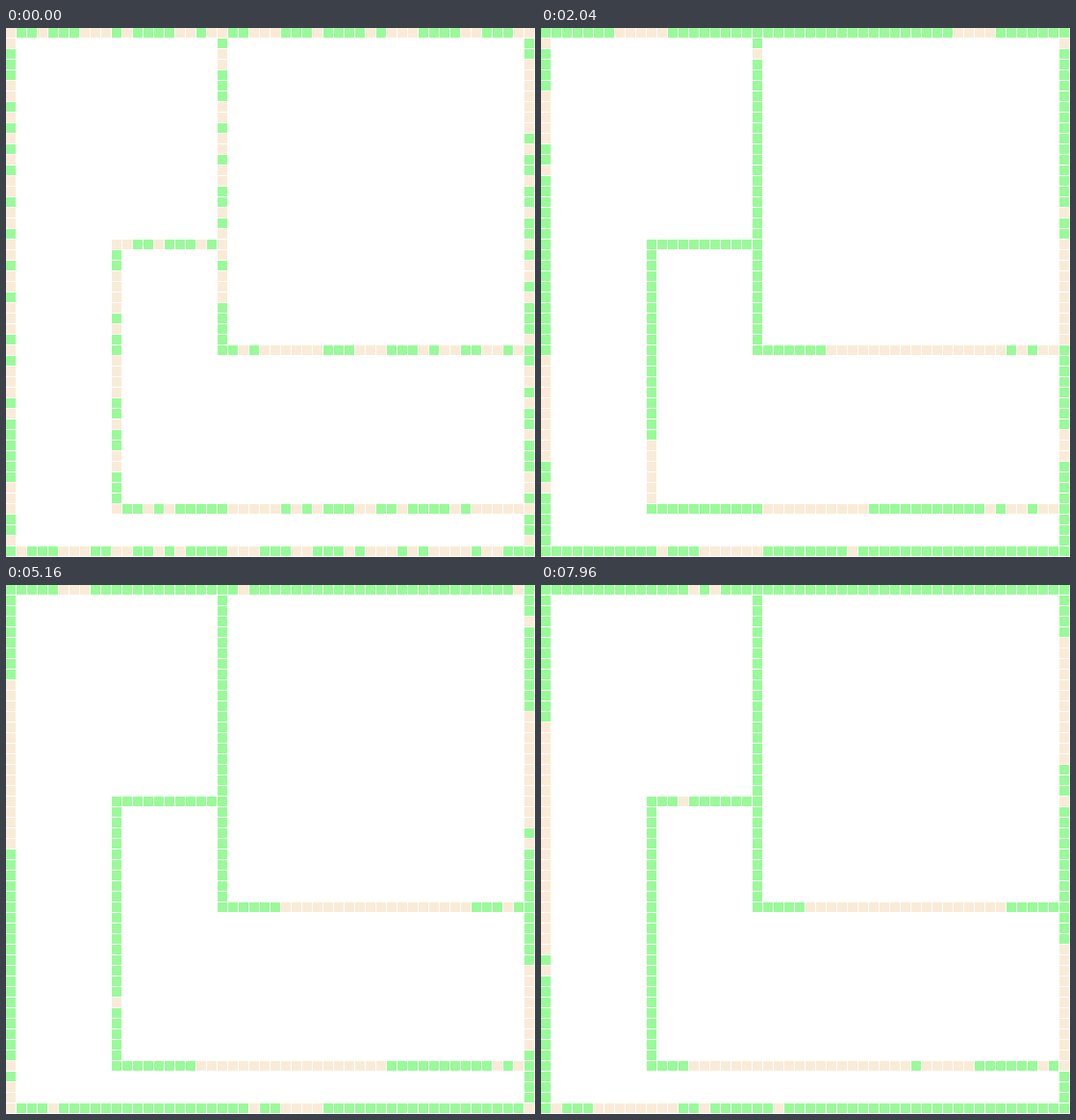
An HTML page for the animation above (8 s loop, 550 by 550 pixels).

```html
<!DOCTYPE html>
<html lang="en">
<head>
<meta charset="utf-8">
<title>Two-state domains on a wire frame</title>
<style>
  html, body { margin: 0; width: 100%; height: 100%; overflow: hidden; background: #fff; }
  svg { display: block; width: 100vw; height: 100vh; }
</style>
</head>
<body>
<svg id="stage" viewBox="0 0 550 550" shape-rendering="crispEdges"></svg>
<script>
const LOOP = 8000, STEP = 40, PITCH = 11, SIZE = 10, LAST = 49;
const GREEN = '#98fb98', CREAM = '#faebd7';
const LIVELY = 0.05, CALM = 0.005;   // chance that a settled cell is flipped
const CREAM_SHARE = 0.44, SETTLE_SECONDS = 0.55;

// A cream run whose two ends drift evenly over the loop; it is gone while they are crossed.
const drift = (first, last, endFirst, endLast) => ({ first, last, endFirst, endLast });
const row = (y, from, to, noise, ...runs) => ({ y, from, to, noise, runs });
const column = (x, from, to, noise, ...runs) => ({ x, from, to, noise, runs });

const lines = [
  row(0, 0, LAST, LIVELY, drift(35, 46, 51, 30), drift(9, 15, 3, 1)),
  row(LAST, 0, LAST, LIVELY, drift(7, 14, 38, 37), drift(-12, -23, 5, 12)),
  column(0, 1, 48, LIVELY, drift(3, 1, 13, 36), drift(22, 31, 58, 67)),
  column(LAST, 1, 48, LIVELY, drift(25, 34, 5, 16), drift(40, 38, 34, 45)),
  column(20, 1, 30, CALM),
  row(20, 10, 19, CALM),
  column(10, 21, 44, CALM, drift(39, 56, 39, 30)),
  row(30, 21, 48, CALM, drift(28, 43, 25, 43), drift(46, 50, 48, 46)),
  row(45, 10, 48, LIVELY, drift(24, 27, 14, 40), drift(42, 49, 47, 47))
];

function random(a, b) {
  let h = Math.imul(a + 1, 374761393) ^ Math.imul(b + 7, 668265263);
  h = Math.imul(h ^ (h >>> 13), 1274126177);
  h = Math.imul(h ^ (h >>> 16), 2246822519);
  return ((h ^ (h >>> 15)) >>> 0) / 4294967296;
}

const mix = (a, b, k) => Math.round(a + (b - a) * k);

const stage = document.getElementById('stage');
const cells = [];
for (const line of lines) {
  for (let n = line.from; n <= line.to; n++) {
    const id = cells.length;
    const rect = document.createElementNS('http://www.w3.org/2000/svg', 'rect');
    rect.setAttribute('x', (line.x ?? n) * PITCH);
    rect.setAttribute('y', (line.y ?? n) * PITCH);
    rect.setAttribute('width', SIZE);
    rect.setAttribute('height', SIZE);
    stage.append(rect);
    cells.push({
      rect, line, n, id,
      startsCream: random(id, 1) < CREAM_SHARE,
      settles: SETTLE_SECONDS * -Math.log(1 - random(id, 2)) + 0.02
    });
  }
}

function isCream({ line, n, id, startsCream, settles }, step) {
  if (step * STEP / 1000 < settles) return startsCream;
  const k = step * STEP / LOOP;
  const inside = line.runs.some(run =>
    n >= mix(run.first, run.endFirst, k) && n <= mix(run.last, run.endLast, k));
  const slot = Math.floor((step + id % 3) / 3);
  const flipped = random(id, slot + 100) < line.noise;
  return inside !== flipped;
}

let shown = -1;
function draw(step) {
  if (step === shown) return;
  shown = step;
  for (const cell of cells) {
    cell.rect.setAttribute('fill', isCream(cell, step) ? CREAM : GREEN);
  }
}

const start = performance.now();
function tick() {
  draw(Math.floor((performance.now() - start) % LOOP / STEP));
  requestAnimationFrame(tick);
}
tick();
</script>
</body>
</html>
```
